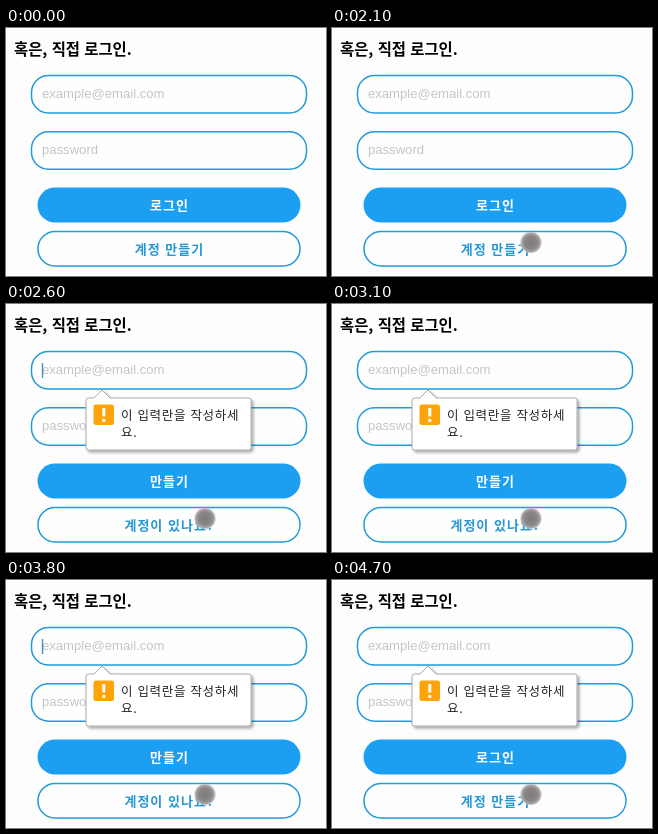
An HTML page that plays this animation: 320x248 px, repeating every 4.8 s.

```html
<!DOCTYPE html>
<html lang="ko">
<head>
<meta charset="utf-8">
<style>
  html, body { margin: 0; width: 100%; height: 100%; overflow: hidden; background: #fefdfe; }
  svg { display: block; width: 320px; height: 248px; }
  text { font-family: "Noto Sans CJK KR", "Noto Sans CJK", sans-serif; }
  .title { font-size: 15.4px; font-weight: 700; }
  .outline { fill: #fefeff; stroke: #229cd6; stroke-width: 1.5; }
  .hint { font: 13.1px "Liberation Sans", Arial, sans-serif; fill: #c5c5c8; }
  .label { font-size: 13px; font-weight: 700; letter-spacing: 1px; text-anchor: middle; }
  .message { font-size: 12.5px; letter-spacing: .7px; fill: #222; }
</style>
</head>
<body>
<svg viewBox="0 0 320 248">
  <defs>
    <radialGradient id="dot">
      <stop offset="0" stop-color="#7f7a7a"/>
      <stop offset=".6" stop-color="#8b8787"/>
      <stop offset=".85" stop-color="#a9a7a7"/>
      <stop offset="1" stop-color="#c8c8c8" stop-opacity=".3"/>
    </radialGradient>
    <filter id="shadow" x="-10%" y="-10%" width="125%" height="130%">
      <feDropShadow dx="2" dy="2" stdDeviation="1.5" flood-opacity=".35"/>
    </filter>
  </defs>

  <text class="title" x="8" y="27">혹은, 직접 로그인.</text>

  <rect class="outline" x="25.5" y="47.5" width="275" height="37.5" rx="17"/>
  <text class="hint" x="36" y="70">example@email.com</text>
  <path id="caret" d="M36.5 59V74" stroke="#4594b5" stroke-width="1.4"/>

  <rect class="outline" x="25.5" y="103.7" width="275" height="37.5" rx="17"/>
  <text class="hint" x="36" y="126">password</text>

  <rect x="31.5" y="159.5" width="263" height="35" rx="17.5" fill="#1d9ff1"/>
  <text class="label" id="submit" x="163.5" y="182" fill="#fff"></text>

  <rect class="outline" x="32" y="203.5" width="262" height="34.5" rx="17"/>
  <text class="label" id="toggle" x="163.5" y="226" fill="#2696d4"></text>

  <g id="bubble">
    <path d="M82.5 94H88L96 86L104 94H242.5Q245 94 245 96.500V143.500Q245 146 242.500 146H82.500Q80 146 80 143.500V96.500Q80 94 82.500 94Z"
      fill="#fff" stroke="#aaa" filter="url(#shadow)"/>
    <rect x="87.500" y="100.500" width="20.500" height="20.500" rx="2.500" fill="#ffa30a"/>
    <path d="M96.300 104H99.300V112.500H96.300ZM96.300 115H99.300V118H96.300Z" fill="#fff"/>
    <text class="message" x="115" y="116">이 입력란을 작성하세</text>
    <text class="message" x="115" y="133">요.</text>
  </g>

  <circle id="pointer" r="11" fill="url(#dot)"/>
</svg>
<script>
const LOOP = 4800;
const CLICKS = [2400, 3900];
const [caret, submit, toggle, bubble, pointer] =
  ["caret", "submit", "toggle", "bubble", "pointer"].map(id => document.getElementById(id));

const clamp = v => Math.min(1, Math.max(0, v));
const mix = (a, b, k) => a + (b - a) * k;
const easeOut = k => 1 - (1 - k) ** 2;
const show = (el, on) => el.setAttribute("visibility", on ? "visible" : "hidden");
const setText = (el, s) => { if (el.textContent !== s) el.textContent = s; };

function draw(t) {
  const clicks = CLICKS.filter(c => t >= c).length;
  const joining = clicks === 1;
  const since = clicks ? t - CLICKS[clicks - 1] : 0;

  setText(submit, joining ? "만들기" : "로그인");
  setText(toggle, joining ? "계정이 있나요?" : "계정 만들기");

  show(caret, clicks && since % 1000 < 500);
  show(bubble, clicks);
  const grow = easeOut(clamp((since + 30) / 200));
  bubble.setAttribute("opacity", grow);
  bubble.setAttribute("transform",
    `translate(80 94) scale(${mix(.9, 1, grow)}) translate(-80 -94)`);

  // The pointer drifts in from the right, then settles on the lower button.
  const enter = clamp((t - 550) / 550);
  const settle = easeOut(clamp((t - 1100) / 800));
  const x = mix(mix(332, 289, enter), 199, settle);
  const y = mix(mix(186, 198, enter), 214.5, settle);
  pointer.setAttribute("transform", `translate(${x} ${y})`);
}

const start = performance.now();
function tick() {
  draw((performance.now() - start) % LOOP);
  requestAnimationFrame(tick);
}
tick();
</script>
</body>
</html>
```
